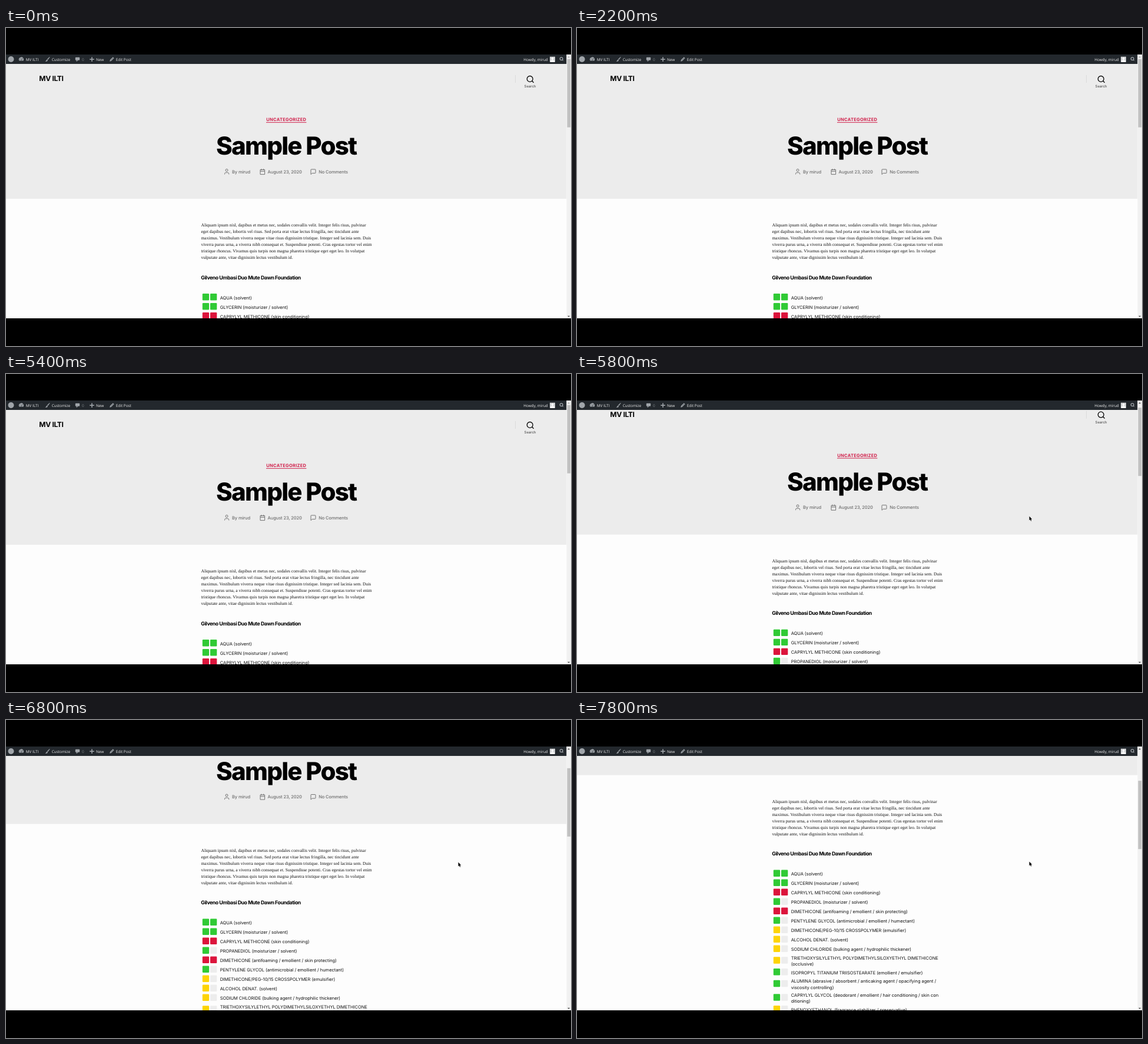
An HTML page with a canvas that plays this animation: 960 by 540 pixels, repeating every 8 s.

```html
<!DOCTYPE html>
<html lang="en">
<head>
<meta charset="utf-8">
<title>Sample Post</title>
<style>
  html, body { margin: 0; width: 100%; height: 100%; overflow: hidden; background: #000; }
  canvas { display: block; width: 960px; height: 540px; }
</style>
</head>
<body>
<canvas id="stage" width="960" height="540"></canvas>
<script>
const ctx = document.getElementById('stage').getContext('2d');

const LOOP = 8000, TICK = 200;
const TOP = 45, BAR_BOTTOM = 61, BOTTOM = 493, PAGE_W = 952.5;
const SANS = 'Inter, sans-serif', SERIF = '"Liberation Serif", serif', UI = '"Open Sans", sans-serif';
const SITE = 'MV ILTI', USER = 'mirud', PRODUCT = 'Gilveno Umbasi Duo Mute Dawn Foundation';
const COLORS = { g: '#30ca35', r: '#dc143c', y: '#fdd406', n: '#ededed' };

const PARAGRAPH = [
  'Aliquam ipsum nisl, dapibus et metus nec, sodales convallis velit. Integer felis risus, pulvinar',
  'eget dapibus nec, lobortis vel risus. Sed porta erat vitae lectus fringilla, nec tincidunt ante',
  'maximus. Vestibulum viverra neque vitae risus dignissim tristique. Integer sed lacinia sem. Duis',
  'viverra purus urna, a viverra nibh consequat et. Suspendisse potenti. Cras egestas tortor vel enim',
  'tristique rhoncus. Vivamus quis turpis non magna pharetra tristique eget eget leo. In volutpat',
  'vulputate ante, vitae dignissim lectus vestibulum id.'
];

// two badge colours, then one or two lines of text
const INGREDIENTS = [
  ['gg', 'AQUA (solvent)'],
  ['gg', 'GLYCERIN (moisturizer / solvent)'],
  ['rr', 'CAPRYLYL METHICONE (skin conditioning)'],
  ['gn', 'PROPANEDIOL (moisturizer / solvent)'],
  ['rr', 'DIMETHICONE (antifoaming / emollient / skin protecting)'],
  ['gn', 'PENTYLENE GLYCOL (antimicrobial / emollient / humectant)'],
  ['yn', 'DIMETHICONE/PEG-10/15 CROSSPOLYMER (emulsifier)'],
  ['yn', 'ALCOHOL DENAT. (solvent)'],
  ['yn', 'SODIUM CHLORIDE (bulking agent / hydrophilic thickener)'],
  ['yn', 'TRIETHOXYSILYLETHYL POLYDIMETHYLSILOXYETHYL DIMETHICONE', '(occlusive)'],
  ['gn', 'ISOPROPYL TITANIUM TRIISOSTEARATE (emollient / emulsifier)'],
  ['gn', 'ALUMINA (abrasive / absorbent / anticaking agent / opacifying agent /', 'viscosity controlling)'],
  ['gn', 'CAPRYLYL GLYCOL (deodorant / emollient / hair conditioning / skin con', 'ditioning)'],
  ['yn', 'PHENOXYETHANOL (fragrance stabilizer / preservative)']
];

// [time, scroll offset]
const SCROLL = [[0, 0], [5600, 0], [6200, 52], [6400, 52], [6800, 113.5], [7400, 132.5], [7800, 196.5], [8000, 196.5]];

function scrollAt(t) {
  const i = SCROLL.findIndex(k => k[0] > t);
  const [t0, a] = SCROLL[i - 1], [t1, b] = SCROLL[i];
  return a + (b - a) * (t - t0) / (t1 - t0);
}

function text(str, x, y, font, color, spacing = 0, align = 'left') {
  ctx.font = font;
  ctx.letterSpacing = spacing + 'px';
  ctx.textAlign = align;
  ctx.fillStyle = color;
  ctx.fillText(str, x, y);
}

function rect(x, y, w, h, color) {
  ctx.fillStyle = color;
  ctx.fillRect(x, y, w, h);
}

function disc(x, y, r, color) {
  ctx.fillStyle = color;
  ctx.beginPath();
  ctx.arc(x, y, r, 0, 7);
  ctx.fill();
}

function poly(points, color) {
  ctx.fillStyle = color;
  ctx.beginPath();
  points.forEach(p => ctx.lineTo(...p));
  ctx.closePath();
  ctx.fill();
}

function strokePath(d, color, width) {
  ctx.strokeStyle = color;
  ctx.lineWidth = width;
  ctx.stroke(new Path2D(d));
}

function magnifier(x, y, r, color, width) {
  ctx.strokeStyle = color;
  ctx.lineWidth = width;
  ctx.beginPath();
  ctx.arc(x, y, r, 0, 7);
  ctx.moveTo(x + r * 0.7, y + r * 0.7);
  ctx.lineTo(x + r * 1.3, y + r * 1.3);
  ctx.stroke();
}

function drawHeader() {
  rect(0, 0, PAGE_W, 290, '#ececec');
  text(SITE, 56.3, 90.2, '700 12px ' + SANS, '#000', -0.3);

  rect(865, 80, 1, 13, '#dadada');
  magnifier(890.2, 86.4, 4.9, '#000', 1.3);
  text('Search', 890.5, 101.2, '500 6px ' + SANS, '#555', -0.05, 'center');

  text('UNCATEGORIZED', 476.3, 158.2, '700 7.5px ' + SANS, '#d01f4a', 0.275, 'center');
  rect(442, 159.8, 68.4, 1, '#d01f4a');
  text('Sample Post', 476.2, 215, '800 42px ' + SANS, '#000', -1.745, 'center');

  const gray = '#6d6d6d', font = '500 7.5px ' + SANS;
  strokePath('M371.5 248.6v-1a2 2 0 0 1 2-2h3.2a2 2 0 0 1 2 2v1M377 241.5a2 2 0 1 1-4 0a2 2 0 1 1 4 0', gray, 0.95);
  strokePath('M432 240.6h7.6v8h-7.6zM432 243.3h7.6M434 239v2.6M437.6 239v2.6', gray, 0.95);
  strokePath('M518.8 240h6.4a0.8 0.8 0 0 1 0.8 0.8v5a0.8 0.8 0 0 1-0.8 0.8h-5l-2.2 2v-7.8a0.8 0.8 0 0 1 0.8-0.8z', gray, 0.95);
  text('By ' + USER, 384, 246.7, font, gray, -0.11);
  text('August 23, 2020', 444.6, 246.7, font, gray, -0.11);
  text('No Comments', 531.2, 246.7, font, gray, -0.11);
}

function drawArticle() {
  PARAGRAPH.forEach((line, i) => text(line, 331.5, 337.2 + i * 11, '7.5px ' + SERIF, '#111'));
  text(PRODUCT, 331.3, 426.5, '700 8.75px ' + SANS, '#000', -0.44);

  let y = 449.8;
  for (const [badges, ...lines] of INGREDIENTS) {
    const height = lines.length > 1 ? 23.5 : 16;
    const mid = y + height / 2;
    [...badges].forEach((key, i) => {
      ctx.fillStyle = COLORS[key];
      ctx.beginPath();
      ctx.roundRect(333.8 + i * 13.2, mid - 6.7, 11.3, 11.3, 1.2);
      ctx.fill();
    });
    const first = mid + 2.7 - (lines.length - 1) * 5.25;
    lines.forEach((line, i) => text(line, 363.7, first + i * 10.5, '7.5px ' + SANS, '#111', -0.04));
    y += height;
  }
}

function drawAdminBar() {
  const icon = '#a0a5aa', font = '6.4px ' + UI;
  const label = (str, x, color = '#eee') => text(str, x, 55.5, font, color);
  rect(0, TOP, PAGE_W, BAR_BOTTOM - TOP, '#23282d');

  disc(8.5, 53, 5, icon);

  ctx.fillStyle = icon;
  ctx.beginPath();
  ctx.arc(26, 53.6, 4.1, Math.PI * 0.85, Math.PI * 2.15);
  ctx.fill();
  strokePath('M26 55l1.8-3.6M23.3 53.4h.9M24.6 51.2l.4.6', '#23282d', 0.8);
  label(SITE, 33.8);

  poly([[74, 49], [74.6, 49.6], [71.4, 54], [70, 52.8]], icon);
  poly([[69.6, 53.2], [71, 54.5], [70, 56.6], [66.6, 57], [68, 55.6]], icon);
  label('Customize', 77.8);

  ctx.fillStyle = icon;
  ctx.beginPath();
  ctx.roundRect(117.8, 49.7, 7.4, 5, 1);
  ctx.fill();
  poly([[119.5, 54.4], [122.6, 54.4], [119.8, 57.2]], icon);
  label('0', 129, '#7c8186');

  rect(142.2, 52.4, 7.6, 1.6, icon);
  rect(145.2, 49.4, 1.6, 7.6, icon);
  label('New', 153);

  poly([[181.6, 49.2], [183.6, 51.2], [178.8, 56], [176.2, 56.8], [176.9, 54]], icon);
  strokePath('M180.2 50.3l2.2 2.2M178.2 54.8l3-3', '#23282d', 0.5);
  label('Edit Post', 186.8);

  label('Howdy, ' + USER, 879.2);
  rect(924, 48.7, 9, 9, '#d0d2d4');
  disc(928.5, 52, 1.9, '#fff');
  ctx.beginPath();
  ctx.ellipse(928.5, 57.7, 3.8, 3.2, 0, Math.PI, 0);
  ctx.fill();
  magnifier(943.6, 52.2, 2.4, icon, 1.2);
}

function drawScrollbar(offset) {
  rect(PAGE_W, TOP, 960 - PAGE_W, BOTTOM - TOP, '#f1f1f1');
  rect(953.5, 52.7 + offset * 0.257, 5.6, 116, '#c1c1c1');
  poly([[954, 50.2], [958.2, 50.2], [956.1, 48]], offset ? '#505050' : '#a8a8a8');
  poly([[954, 488.8], [958.2, 488.8], [956.1, 491]], '#505050');
}

function drawCursor(x, y) {
  ctx.save();
  ctx.translate(x, y);
  const arrow = new Path2D('M0 0V7L1.6 5.6L2.7 8.1L3.8 7.6L2.7 5.2H4.8Z');
  ctx.strokeStyle = '#fff';
  ctx.lineWidth = 1;
  ctx.stroke(arrow);
  ctx.fillStyle = '#000';
  ctx.fill(arrow);
  ctx.restore();
}

function draw(t) {
  const offset = scrollAt(t);
  rect(0, 0, 960, 540, '#000');

  ctx.save();
  ctx.beginPath();
  ctx.rect(0, TOP, 960, BOTTOM - TOP);
  ctx.clip();
  rect(0, TOP, 960, BOTTOM - TOP, '#fdfdfd');
  ctx.translate(0, -offset);
  drawHeader();
  drawArticle();
  ctx.translate(0, offset);
  drawAdminBar();
  drawScrollbar(offset);
  if (t >= 5800) drawCursor(768.5, t < 7000 ? 241.6 : 240.4);
  ctx.restore();
}

ctx.textRendering = 'geometricPrecision';

function loop() {
  const t = performance.now() % LOOP;
  draw(Math.floor(t / TICK) * TICK);
  requestAnimationFrame(loop);
}
loop();
</script>
</body>
</html>
```
